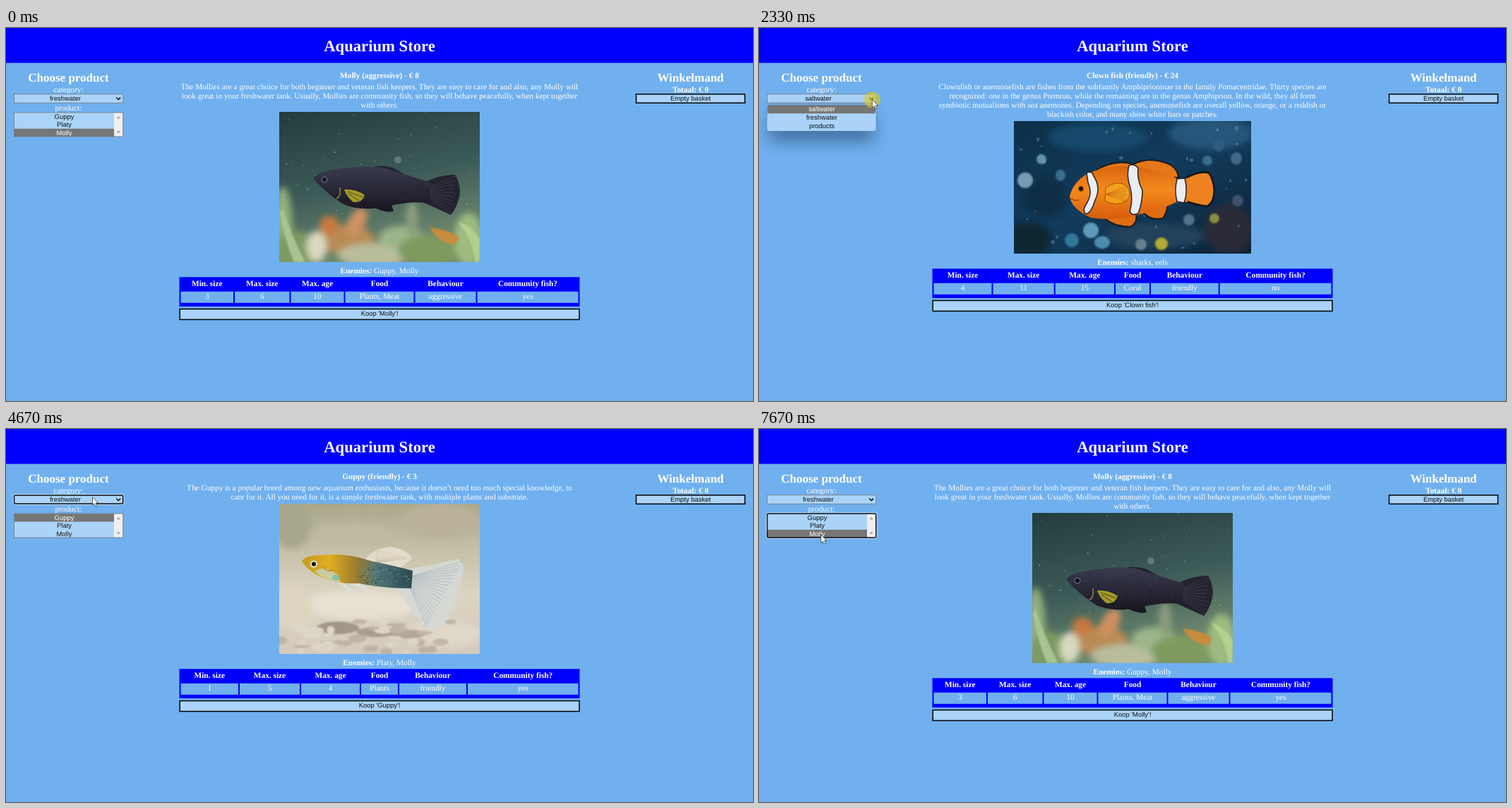
An HTML page for the animation above (8000 ms loop, 1058 by 529 pixels).

```html
<!DOCTYPE html>
<html lang="en">
<head>
<meta charset="utf-8">
<title>Aquarium Store</title>
<style>
  html, body { margin: 0; width: 100%; height: 100%; overflow: hidden; background: #70b0ef; }
  svg { display: block; }
  #stage { width: 100vw; height: 100vh; }
  text { text-anchor: middle; font: 11.33px "Liberation Serif", serif; fill: #fff; text-rendering: geometricPrecision; }
  .bold { font-weight: bold; }
  .h1 { font-size: 22.67px; font-weight: bold; }
  .h2 { font-size: 17px; font-weight: bold; }
  .ui { font: 9.44px "Liberation Sans", sans-serif; fill: #101418; }
  .picked { fill: #fff; }
</style>
</head>
<body>
<svg id="stage" viewBox="0 0 1058 529">
  <defs>
    <filter id="blur" x="-50%" y="-50%" width="200%" height="200%"><feGaussianBlur stdDeviation="5"/></filter>
    <filter id="soft" x="-20%" y="-20%" width="140%" height="140%"><feGaussianBlur stdDeviation="1.3"/></filter>
    <filter id="shade" x="-50%" y="-150%" width="200%" height="400%"><feGaussianBlur stdDeviation="11"/></filter>
    <linearGradient id="deep" x2=".3" y2="1"><stop stop-color="#213d3d"/><stop offset=".55" stop-color="#3c5a58"/><stop offset="1" stop-color="#6f8a6e"/></linearGradient>
    <linearGradient id="reef" x2="1" y2="1"><stop stop-color="#0d3049"/><stop offset=".5" stop-color="#123b5c"/><stop offset="1" stop-color="#0c2336"/></linearGradient>
    <linearGradient id="sand" x2="0" y2="1"><stop stop-color="#aaa78b"/><stop offset=".35" stop-color="#c9c3ab"/><stop offset=".6" stop-color="#dcd4c3"/><stop offset="1" stop-color="#d3cabb"/></linearGradient>
    <linearGradient id="tank" x2="0" y2="1"><stop stop-color="#a9b69c"/><stop offset=".4" stop-color="#c6cbc4"/><stop offset=".62" stop-color="#e2e2e2"/><stop offset="1" stop-color="#cfcdc9"/></linearGradient>
    <linearGradient id="mollyBody" x2="0" y2="1"><stop stop-color="#3a3b50"/><stop offset=".5" stop-color="#292838"/><stop offset="1" stop-color="#1a1922"/></linearGradient>
    <linearGradient id="clownBody" x2="0" y2="1"><stop stop-color="#d9650f"/><stop offset=".45" stop-color="#f58a1d"/><stop offset="1" stop-color="#d75c0c"/></linearGradient>
    <linearGradient id="guppyBody"><stop stop-color="#c79a1c"/><stop offset=".25" stop-color="#dfae20"/><stop offset=".5" stop-color="#9a7a30"/><stop offset=".68" stop-color="#4d7476"/><stop offset="1" stop-color="#2d4a52"/></linearGradient>
    <linearGradient id="platyBody"><stop stop-color="#5c1406"/><stop offset=".15" stop-color="#d03a0c"/><stop offset=".42" stop-color="#f37f12"/><stop offset=".7" stop-color="#fbb01b"/><stop offset="1" stop-color="#e08d10"/></linearGradient>
  </defs>
  <rect width="1058" height="529" fill="#70b0ef"/>
  <rect width="1058" height="49.5" fill="#00f"/>
  <text x="529" y="32.5" class="h1">Aquarium Store</text>
  <text x="88.5" y="76.1" class="h2">Choose product</text>
  <text x="969.5" y="76.1" class="h2">Winkelmand</text>
  <text x="969.5" y="90.6" class="bold">Totaal: € 0</text>
  <g id="basket"></g>
  <g id="pages"></g>
  <g id="panel"></g>
  <g id="pointer">
    <circle id="ring" r="11.5" cy=".4" fill="#dcc820"/>
    <path d="M0 0V11.6L2.7 9.1 4.5 13.2 6.5 12.3 4.8 8.4H8.5Z" fill="#fff" stroke="#222" stroke-width=".7"/>
  </g>
</svg>
<script>
const $ = id => document.getElementById(id);
const text = (x, y, s, cls = '') => `<text x="${x}" y="${y}" class="${cls}">${s}</text>`;
const rect = (x, y, x2, y2, fill, more = '') =>
  `<rect x="${x}" y="${y}" width="${x2 - x}" height="${y2 - y}" fill="${fill}" ${more}/>`;
const path = (d, fill, more = '') => `<path d="${d}" fill="${fill}" ${more}/>`;
const oval = (x, y, rx, ry, fill, more = '') =>
  `<ellipse cx="${x}" cy="${y}" rx="${rx}" ry="${ry}" fill="${fill}" ${more}/>`;
const group = (attrs, ...parts) => `<g ${attrs}>${parts.join('')}</g>`;
const LIGHT = '#abd3f8', GREY = '#767676', PAGE = '#70b0ef';

function scatter(count, seed, draw) {
  const random = () => (seed = (seed * 16807) % 2147483647) / 2147483647;
  for (let i = 0; i < 20; i++) random();
  return Array.from({ length: count }, () => draw(random)).join('');
}

// Fin rays from one base point to evenly spaced points on a chord.
function rays(x, y, x1, y1, x2, y2, count, color, width = .8) {
  let d = '';
  for (let i = 0; i <= count; i++) {
    const k = i / count;
    d += `M${x} ${y}L${x1 + (x2 - x1) * k} ${y1 + (y2 - y1) * k}`;
  }
  return path(d, 'none', `stroke="${color}" stroke-width="${width}"`);
}

const button = (x, y, x2, y2, label, baseline) =>
  rect(x, y, x2, y2, LIGHT, 'stroke="#000" stroke-width="1.5"') + text((x + x2) / 2, baseline, label, 'ui');

const photos = {
  molly: () => rect(387, 119, 671, 332, 'url(#deep)') +
    group('filter="url(#blur)"',
      oval(392, 285, 14, 60, '#8fae7c'), oval(412, 318, 30, 30, '#7d9a62'),
      oval(480, 300, 42, 20, '#b98a55'), oval(458, 280, 14, 13, '#c9793c'),
      oval(497, 275, 12, 22, '#cf9160', 'transform="rotate(30 497 275)"'),
      oval(520, 322, 50, 17, '#b9bd9c'), oval(560, 298, 32, 17, '#9db58b'),
      oval(440, 310, 14, 22, '#d8d9bf'), oval(600, 315, 45, 22, '#7f9a5e'),
      oval(655, 300, 20, 38, '#9dbb80'), oval(575, 270, 9, 25, '#8a9b7c')) +
    group('filter="url(#soft)"',
      path('M600 283Q625 285 642 297L636 307Q612 304 600 283Z', '#c98c3a'),
      path('M640 275Q662 300 664 332H671V300Q660 280 640 275Z', '#b4cf8e'),
      path('M392 255Q402 290 424 332H408Q394 300 388 262Z', '#a9c493')) +
    scatter(60, 77, r => oval(387 + r() * 284, 119 + r() * 150, .4 + r() * .7, .4 + r() * .6, '#c5d5d2', `opacity="${.2 + r() * .5}"`)) +
    oval(555, 187, 5, 5, '#8aa09a', 'opacity=".5"') +
    path('M522 196Q545 194 558 204 570 210 573 218 550 217 538 206Z', '#20202b') +
    path('M518 252Q535 263 549 260L545 248Z', '#181820') +
    path('M592 219Q615 208 636 208 645 222 642 240 637 258 630 265 610 256 588 246Z', '#24232f') +
    rays(585, 232, 637, 210, 631, 263, 9, '#454456', .7) +
    path('M436 211Q446 203 465 201 505 194 535 198 565 208 602 219L600 248Q570 245 540 253 505 261 478 250 450 232 436 214Z', 'url(#mollyBody)') +
    scatter(90, 19, r => oval(465 + r() * 120, 207 + r() * 36, .6, .5, '#65657f', 'opacity=".55"')) +
    path('M479 229Q496 228 508 237 505 248 492 247 482 239 479 229Z', '#a49a2b') +
    path('M484 232L506 240M485 235L500 245', 'none', 'stroke="#4b4618"') +
    path('M468 242Q475 239 473 226', 'none', 'stroke="#8d8547" stroke-width="1.5"') +
    oval(451, 215, 4.5, 4.5, '#60647a') + oval(451, 215, 3, 3, '#0d0d12'),

  clown: () => rect(361, 132, 697, 320, 'url(#reef)') +
    group('filter="url(#blur)"',
      oval(640, 150, 60, 22, '#26567a'), oval(480, 155, 70, 20, '#184a6c'),
      oval(380, 300, 35, 25, '#0c2533'), oval(665, 285, 35, 35, '#2a2c39'),
      oval(560, 295, 70, 18, '#23425c'), oval(405, 240, 30, 30, '#0d2f47')) +
    group('filter="url(#soft)" opacity=".8"',
      oval(377, 216, 11, 11, '#8fb6ce'), oval(400, 186, 7, 7, '#75a9ca'),
      oval(470, 287, 11, 11, '#70b3d2'), oval(486, 304, 11, 9, '#5ba2c4'),
      oval(443, 301, 10, 10, '#3d86a9'), oval(427, 209, 7, 8, '#477b9b'),
      oval(570, 306, 9, 9, '#d5c528'), oval(645, 270, 7, 7, '#a4a83c'),
      oval(651, 167, 8, 8, '#315f83'), oval(676, 185, 8, 9, '#4a7693'),
      oval(635, 188, 7, 7, '#457b9c'), oval(609, 272, 8, 8, '#63839a'),
      oval(678, 245, 8, 8, '#505a75'), oval(541, 307, 8, 8, '#78909d')) +
    scatter(30, 41, r => oval(361 + r() * 336, 140 + r() * 175, 1 + r() * 2, 1 + r() * 2, '#8bb4ca', 'opacity=".35"')) +
    path('M478 201Q505 186 530 193 555 181 583 194 594 202 594 212L480 212Z', '#e4771a', 'stroke="#17191e" stroke-width="2"') +
    path('M484 265Q500 282 526 282 538 276 533 260Z', '#de6d13', 'stroke="#17191e" stroke-width="2"') +
    path('M542 258Q552 274 572 270 580 258 578 246Z', '#de6d13', 'stroke="#17191e" stroke-width="2"') +
    path('M602 214Q622 202 637 205 644 215 645 230 645 247 635 253 618 251 602 245Z', '#ee8220', 'stroke="#17191e" stroke-width="3"') +
    path('M440 239Q445 218 466 206 500 193 535 197 570 203 594 214L607 213V247L593 246Q570 258 540 264 505 275 470 269 443 257 440 239Z', 'url(#clownBody)') +
    group('fill="#e9edf1" stroke="#20222a" stroke-width="1.5"',
      '<path d="M464 205Q472 202 474 210 485 227 476 244 471 262 463 264 457 259 464 249 473 235 466 219Z"/>',
      '<path d="M524 195Q532 192 537 199 535 215 543 230 543 248 537 263 528 267 525 260 530 245 526 227 520 210 524 195Z"/>',
      '<path d="M592 214L603 213Q608 232 602 248L592 246Q588 231 592 214Z"/>') +
    path('M491 227Q508 214 521 224 529 235 521 245 505 254 490 245Z', '#f1a01e', 'stroke="#a24b0a"') +
    rays(490, 236, 521, 224, 520, 246, 6, '#c66a10', .7) +
    path('M441 242Q448 246 453 244', 'none', 'stroke="#77340a"') +
    oval(456, 228, 4.2, 4.2, '#9a4c12') + oval(456, 228, 2.7, 2.7, '#111'),

  guppy: () => rect(387, 106, 671, 319, 'url(#sand)') +
    group('filter="url(#blur)"',
      oval(405, 135, 28, 35, '#a7a78d'), oval(615, 130, 55, 25, '#b9b299'),
      oval(490, 150, 60, 15, '#c1baa2'), oval(500, 250, 85, 20, '#e8e1d3'),
      oval(630, 292, 40, 18, '#e0d8c9'), oval(410, 255, 25, 28, '#ded5c0')) +
    group('filter="url(#soft)" opacity=".7"',
      oval(470, 282, 30, 9, '#8c8170'), oval(524, 288, 28, 7, '#958a79'), oval(570, 291, 24, 6, '#a0968a'),
      scatter(45, 29, r => oval(387 + r() * 284, 268 + r() * 50, 5 + r() * 9, 2 + r() * 4, r() > .35 ? '#e1d9cc' : '#b5aa9b'))) +
    path('M508 185Q521 169 545 167 569 171 575 184L558 197Z', '#ece5d7', 'opacity=".75"') +
    rays(524, 190, 525, 170, 573, 183, 9, '#c3b69d', .6) +
    path('M466 214Q482 217 497 235 484 233 477 224Z M485 219L520 234 505 219Z', '#dce0d8', 'opacity=".85"') +
    path('M568 199Q605 193 640 184 653 193 645 215 638 248 624 271 609 286 597 282 574 263 554 226Z', '#d5d9d5', 'opacity=".9"') +
    rays(566, 211, 646, 188, 596, 281, 19, '#a9b9c0', .8) +
    path('M419 187Q426 178 448 179 482 175 516 187 550 194 576 201L574 226Q535 226 500 219 470 220 452 212 428 203 419 187Z', 'url(#guppyBody)') +
    path('M437 202Q452 192 470 207L474 218Q450 214 437 202Z', '#c8d4bd', 'opacity=".8"') +
    oval(467, 211, 5, 4, '#73bfae', 'opacity=".8"') +
    scatter(80, 63, r => oval(500 + r() * 72, 197 + r() * 23, 1.1, .8, r() > .5 ? '#223b46' : '#79a8a6', 'opacity=".65"')) +
    path('M449 196Q455 204 463 200', 'none', 'stroke="#85671a"') +
    oval(436, 191.5, 5.2, 5.2, '#dedcc5') + oval(436, 191.5, 3, 3, '#14171a'),

  platy: () => rect(387, 106, 671, 319, 'url(#tank)') +
    group('filter="url(#blur)"',
      oval(393, 128, 27, 45, '#839a62'), oval(470, 118, 60, 14, '#a1b287'),
      oval(630, 130, 50, 35, '#ced2cf'), oval(540, 150, 70, 20, '#c4cbbf'),
      oval(520, 250, 130, 17, '#eeeeed')) +
    group('filter="url(#soft)"',
      scatter(110, 37, r => oval(387 + r() * 284, 232 + r() * 62, 5 + r() * 8, 3 + r() * 5, ['#f1f1f0', '#dedddb', '#cfceca'][r() * 3 | 0], 'opacity=".7"'))) +
    group('stroke="#9b9890" stroke-width=".8"',
      scatter(34, 83, r => oval(387 + r() * 284, 285 + r() * 32, 10 + r() * 8, 7 + r() * 7, ['#efeeeb', '#dedcd8', '#e8e6e2'][r() * 3 | 0]))) +
    path('M481 191Q483 170 492 161 507 150 523 157 539 166 544 183Z', '#272016') +
    rays(520, 199, 483, 164, 540, 166, 15, '#d7d1bb', .9) +
    path('M478 190Q450 190 420 177L414 193 411 216 417 245 427 265Q450 255 478 240Z', '#c8c4b5', 'opacity=".75"') +
    path('M483 191Q455 193 431 187 422 215 433 254 457 250 484 237Z', '#17120f') +
    rays(482, 215, 418, 180, 426, 264, 18, '#211914', 1.5) +
    rays(450, 216, 417, 185, 423, 260, 12, '#d2c8a9', .6) +
    path('M521 244Q526 255 524 260 539 255 552 241Z', '#e9a52b') +
    path('M469 193Q506 189 533 181 565 174 600 184 625 190 636 200 630 211 612 228 585 245 550 246 510 247 469 233Q463 212 469 193Z', 'url(#platyBody)') +
    path('M500 210Q540 196 595 200M510 225Q550 238 590 228', 'none', 'stroke="#ffc955" stroke-width="7" opacity=".35" filter="url(#soft)"') +
    scatter(90, 51, r => oval(490 + r() * 95, 197 + r() * 35, 1.5, .7, '#c8660d', 'opacity=".35"')) +
    path('M553 216Q575 207 589 214 581 229 562 232Z', '#f8bd35', 'opacity=".75"') +
    path('M596 190Q589 211 602 228', 'none', 'stroke="#c97810" stroke-width="1.2"') +
    path('M629 198L636 196 635 204Z', '#4b2510') +
    oval(612, 203.5, 8, 8, '#f4e784') + oval(612, 203.5, 4, 4, '#11110f')
};

const pages = {
  molly: {
    name: 'Molly', title: 'Molly (aggressive) - € 8', bottom: 332, enemies: 'Guppy, Molly',
    lines: ['The Mollies are a great choice for both beginner and veteran fish keepers. They are easy to care for and also, any Molly will',
      'look great in your freshwater tank. Usually, Mollies are community fish, so they will behave peacefully, when kept together',
      'with others.'],
    view: [387, 119, 284, 213], splits: [323, 402.5, 479.5, 578.5, 666.5],
    cells: ['3', '6', '10', 'Plants, Meat', 'aggressive', 'yes']
  },
  clown: {
    name: 'Clown fish', title: 'Clown fish (friendly) - € 24', bottom: 320, enemies: 'sharks, eels',
    lines: ['Clownfish or anemonefish are fishes from the subfamily Amphiprioninae in the family Pomacentridae. Thirty species are',
      'recognized: one in the genus Premnas, while the remaining are in the genus Amphiprion. In the wild, they all form',
      'symbiotic mutualisms with sea anemones. Depending on species, anemonefish are overall yellow, orange, or a reddish or',
      'blackish color, and many show white bars or patches.'],
    view: [361, 132, 336, 188], splits: [330.5, 418.7, 504, 554, 651.7],
    cells: ['4', '11', '15', 'Coral', 'friendly', 'no']
  },
  guppy: {
    name: 'Guppy', title: 'Guppy (friendly) - € 3', bottom: 319, enemies: 'Platy, Molly',
    lines: ['The Guppy is a popular breed among new aquarium enthusiasts, because it doesn’t need too much special knowledge, to',
      'care for it. All you need for it, is a simple freshwater tank, with multiple plants and substrate.'],
    view: [387, 106, 284, 213], splits: [330, 417, 502, 556, 653],
    cells: ['1', '5', '4', 'Plants', 'friendly', 'yes']
  },
  platy: {
    name: 'Platy', title: 'Platy (friendly) - € 6', bottom: 319, enemies: 'Guppy, Molly',
    lines: ['The Platy Fish, is another great choice for beginner fish keepers. It is a breed, that you can care for easily, and looks great in',
      'pretty much any community tank, due to its peaceful nature.'],
    view: [387, 106, 284, 213], splits: [323, 402.5, 479.5, 578.5, 666.5],
    cells: ['2', '5', '5', 'Plants, Meat', 'friendly', 'yes']
  }
};
const headings = ['Min. size', 'Max. size', 'Max. age', 'Food', 'Behaviour', 'Community fish?'];

function pageMarkup(key) {
  const p = pages[key], b = p.bottom, [x, y, w, h] = p.view;
  const edges = [246.5, ...p.splits, 811.5];
  return group(`id="${key}"`,
    text(529, 71.3, p.title, 'bold'),
    ...p.lines.map((line, i) => text(529, 87.3 + 13 * i, line)),
    `<svg x="${x}" y="${y}" width="${w}" height="${h}" viewBox="${p.view.join(' ')}">${photos[key]()}</svg>`,
    text(529, b + 16, `<tspan class="bold">Enemies:</tspan> ${p.enemies}`),
    rect(245.5, b + 21.3, 812.5, b + 63, '#00f'),
    ...headings.map((heading, i) => {
      const middle = (edges[i] + edges[i + 1]) / 2;
      return text(middle, b + 34.2, heading, 'bold') +
        rect(edges[i] + 1, b + 41.8, edges[i + 1] - 1, b + 57.8, PAGE) +
        text(middle, b + 52.3, p.cells[i]);
    }),
    button(246.2, b + 66.5, 812, b + 81.5, `Koop '${p.name}'!`, b + 75.5));
}

const field = (y, y2, focused) => focused
  ? rect(10.4, y - 1, 167, y2 + 1, 'none', 'rx="2.5" stroke="#fff" stroke-width=".8"') +
    rect(11.6, y + .1, 165.7, y2 - .1, 'none', 'rx="1.5" stroke="#101010" stroke-width="1.5"')
  : rect(11.5, y, 165.8, y2, 'none', `stroke="${GREY}" stroke-width=".8"`);

function panelMarkup({ category, picked, focus, shadow, hover }) {
  const salt = category === 'saltwater';
  const products = salt ? ['Clown fish'] : ['Guppy', 'Platy', 'Molly'];
  const end = salt ? 131.8 : 154;
  const arrows = salt
    ? path('M156.8 124.8L159.2 122 161.6 124.8ZM156.8 127.4L159.2 130.2 161.6 127.4Z', '#8b8b8b')
    : path('M156.4 128.2L159.2 125 162 128.2ZM156.4 146.2L159.2 149.4 162 146.2Z', '#a3a3a3');
  let html = text(88.5, 90.6, 'category:') + rect(11.5, 93.8, 165.8, 106.2, LIGHT) +
    field(93.8, 106.2, focus === 'category') + text(84, 103.3, category, 'ui') +
    path('M156.3 98.6L159.2 101.5 162.1 98.6', 'none', 'stroke="#111" stroke-width="1.5"') +
    text(88.5, 116.8, 'product:') + rect(11.5, 120, 165.8, end, LIGHT);
  products.forEach((name, i) => {
    const y = 120.2 + 11.3 * i;
    if (i === picked) html += rect(11.9, y, 153, Math.min(y + 11.3, end), GREY);
    html += text(82.5, y + 8.7, name, i === picked ? 'ui picked' : 'ui');
  });
  html += rect(153, 120.3, 165.4, end - .3, '#f0f0f0') + arrows + field(120, end, focus === 'product');
  if (shadow) {
    html += rect(14, 122, 163, 162, '#0b2440', `opacity="${.42 * shadow}" filter="url(#shade)"`) +
      rect(11.5, 109, 165.6, 146, LIGHT, 'rx="3"');
    ['saltwater', 'freshwater', 'products'].forEach((name, i) => {
      const y = 109 + 12.2 * i;
      if (i === hover) html += rect(11.5, y, 165.2, y + 12.3, GREY, i === 1 ? '' : 'rx="3"');
      html += text(89, y + 9, name, i === hover ? 'ui picked' : 'ui');
    });
  }
  return html;
}

// [time, value]: the last entry that has begun applies.
const current = (steps, t) => steps.filter(s => s[0] <= t).pop()[1];
const pageSteps = [[0, 'molly'], [470, 'clown'], [3530, 'guppy'], [5670, 'platy'], [7000, 'molly']];
const pickSteps = [[0, 2], [470, 0], [5530, 1], [6870, 2]];
const focusSteps = [[0, ''], [3530, 'category'], [5530, 'product']];
const clicks = [[1870, 2330], [3400, 4000], [5530, 5870], [6870, 7470]];
const route = [
  [400, 80, -14], [730, 80, 48], [930, 80, 48], [1330, 87, 116], [1800, 163, 96.5],
  [2270, 163, 96.5], [2600, 138, 142], [2930, 121, 126], [3930, 121, 126],
  [4270, 156, 108], [4670, 122.5, 96.5], [4870, 122.5, 96.5], [5070, 155, 112],
  [5330, 90, 137], [5870, 90, 137], [6400, 87.7, 150], [8000, 87.7, 150]
];

function pointerAt(t) {
  const i = Math.max(1, route.findIndex(stop => stop[0] >= t));
  const [t0, x0, y0] = route[i - 1], [t1, x1, y1] = route[i];
  const k = Math.max(0, Math.min(1, (t - t0) / (t1 - t0)));
  const ease = k * k * (3 - 2 * k);
  return [x0 + (x1 - x0) * ease, y0 + (y1 - y0) * ease];
}

function ringAt(t) {
  const click = clicks.filter(c => c[0] <= t).pop();
  if (!click) return 0;
  return t < click[1] ? 1 : Math.max(0, 1 - (t - click[1] + 67) / 267);
}

$('basket').innerHTML = button(892.5, 93.8, 1046.5, 106.3, 'Empty basket', 103.3);
$('pages').innerHTML = Object.keys(pages).map(pageMarkup).join('');

const STEP = 1000 / 15;
let lastPanel = '';

function render(now) {
  const t = Math.floor((now % 8000 + 4) / STEP) * STEP + 4;
  const page = current(pageSteps, t);
  for (const key in pages) $(key).style.display = key === page ? '' : 'none';

  const [x, y] = pointerAt(t);
  const open = t >= 1930 && t < 3530;
  const panel = panelMarkup({
    category: t >= 470 && t < 3530 ? 'saltwater' : 'freshwater',
    picked: current(pickSteps, t),
    focus: current(focusSteps, t),
    shadow: open ? Math.min(1, (t - 1860) / 270) : 0,
    hover: Math.max(0, Math.min(2, Math.floor((y - 109) / 12.2)))
  });
  if (panel !== lastPanel) $('panel').innerHTML = lastPanel = panel;

  $('pointer').style.display = t < 470 ? 'none' : '';
  $('pointer').setAttribute('transform', `translate(${x} ${y})`);
  $('ring').setAttribute('opacity', .88 * ringAt(t));
}

const start = performance.now();
function loop() {
  render(performance.now() - start);
  requestAnimationFrame(loop);
}
loop();
</script>
</body>
</html>
```
